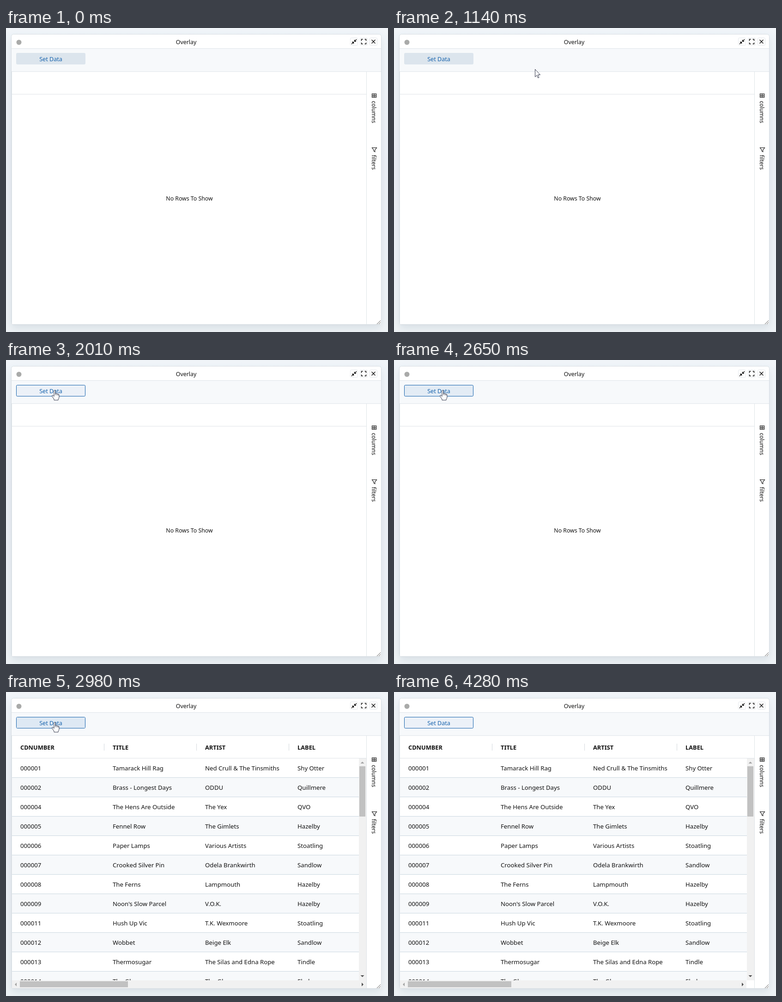
Recreate the animation shown at these times as an HTML page. Size 827 by 659 pixels, loop 4.76 s.

```html
<!DOCTYPE html>
<html lang="en">
<head>
<meta charset="utf-8">
<title>Overlay</title>
<style>
  html, body { margin: 0; width: 100%; height: 100%; overflow: hidden; background: #eff3f7; }
  svg { display: block; width: 827px; height: 659px; }
  text { font-family: "Noto Sans", "Open Sans", sans-serif; font-size: 13.2px; fill: #111; }
  .medium { font-weight: 500; }
  .head { font-weight: 700; font-size: 12.8px; }
  .side { font-size: 12.1px; }
  .line { fill: none; stroke: #111; stroke-width: 1.1; }
  .cursor { fill: #fff; stroke: #34384c; stroke-width: 1; stroke-linejoin: round; }
</style>
</head>
<body>
<svg viewBox="0 0 827 659">
  <defs>
    <linearGradient id="page" x2="0" y2="1">
      <stop stop-color="#f1f5f9"/>
      <stop offset=".45" stop-color="#eceff5"/>
      <stop offset="1" stop-color="#eff3f6"/>
    </linearGradient>
    <filter id="shadow" x="-10%" y="-10%" width="120%" height="120%">
      <feDropShadow dx="0" dy="8" stdDeviation="9" flood-color="#60748a" flood-opacity=".15"/>
    </filter>
    <clipPath id="buttonClip"><rect x="23" y="55" width="148" height="23" rx="1"/></clipPath>
    <clipPath id="rowClip"><rect x="13" y="144" width="751" height="481"/></clipPath>
  </defs>

  <rect width="827" height="659" fill="url(#page)"/>
  <rect x="11.5" y="13.5" width="801" height="630" rx="5" fill="#fff" stroke="#d6dde3" filter="url(#shadow)"/>

  <!-- title bar -->
  <circle cx="28" cy="31" r="5.5" fill="#a9aaa9"/>
  <text class="medium" x="390" y="35" text-anchor="middle" style="font-size:12.4px">Overlay</text>
  <g fill="#fff" stroke="#e4e8ec">
    <rect x="745.5" y="21.5" width="16" height="16" rx="2"/>
    <rect x="766.5" y="21.5" width="16" height="16" rx="2"/>
    <rect x="787.5" y="21.5" width="16" height="16" rx="2"/>
  </g>
  <path class="line" d="M754.5 25.5V29H758M754.5 29L759 24.5M749 30.5H752.5V34M752.5 30.5L748 35" style="stroke-width:1.4"/>
  <path class="line" d="M769.5 28V24.5H772.5M776.5 24.5H779.5V28M779.5 31.500V34.500H776.500M772.500 34.500H769.500V31.500" style="stroke-width:1.4"/>
  <path class="line" d="M791.500 25.500L799.500 33.500M799.500 25.500L791.500 33.500" style="stroke-width:1.4"/>

  <!-- toolbar -->
  <rect x="12" y="45" width="800" height="49" fill="#f7f9fb"/>
  <path d="M12 44.500H812M12 94.500H812" stroke="#dfe4e9"/>
  <rect id="button" x="22.500" y="54.500" width="149" height="24" rx="2"/>
  <circle id="ripple" cx="97" cy="67" clip-path="url(#buttonClip)"/>
  <text class="medium" x="97" y="72" text-anchor="middle" style="font-size:12.6px;fill:#1763ad">Set Data</text>

  <!-- grid body -->
  <path d="M12.500 95V642M13 143.500H780M13 642.500H811" stroke="#dfe4e8"/>
  <text id="empty" x="397" y="374" text-anchor="middle" style="font-size:12.3px">No Rows To Show</text>
  <g id="grid">
    <g id="rows" clip-path="url(#rowClip)"></g>
    <g id="heads"></g>
    <rect x="764" y="144" width="16" height="481" fill="#f1f1f1"/>
    <rect x="765" y="161" width="13" height="109" fill="#c1c1c1"/>
    <path d="M767.500 155H775.500L771.500 151Z" fill="#a3a3a3"/>
    <path d="M767.500 614H775.500L771.500 618Z" fill="#505050"/>
    <rect id="track" x="13" y="625" height="17" fill="#f1f1f1"/>
    <rect id="thumb" x="30" y="627" height="13" fill="#c1c1c1"/>
    <path d="M23 630V638L19 634Z" fill="#a3a3a3"/>
    <path id="rightArrow" d="M-2 -4V4L2 0Z" fill="#505050"/>
  </g>

  <!-- side bar -->
  <path d="M780.500 95V642" stroke="#dfe4e8"/>
  <path class="line" d="M792.500 142.500H801.500V150.500H792.500ZM792.500 145.500H801.500M792.500 148H801.500M797 143V150"/>
  <path class="line" d="M792.500 259.500H802.500L798.700 264.500V268.500L796 266.500V264.500Z"/>
  <text class="side" transform="translate(792 158) rotate(90)">columns</text>
  <text class="side" transform="translate(792 275) rotate(90)">filters</text>
  <path d="M803 642L811 634M807 642L811 638" stroke="#555"/>

  <g id="cursor" class="cursor">
    <path data-kind="arrow" d="M.5 .5V17L4.200 13.500L6.700 19.200L9 18.200L6.500 12.500H11.500Z"/>
    <path data-kind="move" d="M0 -10.500L4 -6.500H1.500V-1.500H6.500V-4L10.500 0L6.500 4V1.500H1.500V6.500H4L0 10.500L-4 6.500H-1.500V1.500H-6.500V4L-10.500 0L-6.500 -4V-1.500H-1.500V-6.500H-4Z"/>
    <g data-kind="hand">
      <path d="M-2 1Q-2 -.5 -.500 -.500Q1 -.500 1 1V6.500Q3.500 5 4.200 7.500Q6.500 6.500 7 8.500Q9 8 9 10.500V14Q9 17 7 19V21H-2V19L-6.200 12.500Q-6.800 10.500 -5 10.500Q-3.500 10.800 -2 13Z"/>
      <path d="M1 6V10M4.200 7.500V10.500M7 8.500V11" fill="none"/>
    </g>
  </g>
</svg>

<script>
const LOOP = 4760, HOVER = 1930, PRESS = 2650, RELEASE = 2820, FILLED = 2980;
const NS = "http://www.w3.org/2000/svg";
const $ = id => document.getElementById(id);

function set(node, attrs) {
  for (const key in attrs) node.setAttribute(key, attrs[key]);
}
function add(parent, tag, attrs, text) {
  const node = document.createElementNS(NS, tag);
  set(node, attrs);
  if (text) node.textContent = text;
  parent.appendChild(node);
}
const show = (node, on) => node.setAttribute("visibility", on ? "visible" : "hidden");

const records = [
  ["000001", "Tamarack Hill Rag", "Ned Crull & The Tinsmiths", "Shy Otter"],
  ["000002", "Brass - Longest Days", "ODDU", "Quillmere"],
  ["000004", "The Hens Are Outside", "The Yex", "QVO"],
  ["000005", "Fennel Row", "The Gimlets", "Hazelby"],
  ["000006", "Paper Lamps", "Various Artists", "Stoatling"],
  ["000007", "Crooked Silver Pin", "Odela Brankwirth", "Sandlow"],
  ["000008", "The Ferns", "Lampmouth", "Hazelby"],
  ["000009", "Noon's Slow Parcel", "V.O.K.", "Hazelby"],
  ["000011", "Hush Up Vic", "T.K. Wexmoore", "Stoatling"],
  ["000012", "Wobbet", "Beige Elk", "Sandlow"],
  ["000013", "Thermosugar", "The Silas and Edna Rope", "Tindle"],
  ["000014", "The Glens", "The Glens", "Elmbury"]
];

function buildGrid() {
  records.forEach((cells, row) => {
    const y = 144 + row * 42;
    add($("rows"), "rect", { x: 13, y, width: 751, height: 42, fill: row % 2 ? "#f7f9fb" : "#fff" });
    add($("rows"), "path", { d: `M13 ${y + 41.5}H764`, stroke: "#cbd8e1" });
    cells.forEach((cell, col) => add($("rows"), "text", { x: 31 + col * 200, y: y + 26 }, cell));
  });
  ["CDNUMBER", "TITLE", "ARTIST", "LABEL"].forEach((name, col) => {
    add($("heads"), "text", { class: "head", x: 31 + col * 200, y: 125 }, name);
    if (col) add($("heads"), "path", { d: `M${12.5 + col * 200} 112V127`, stroke: "#d5dade" });
  });
}

// Pointer strokes: each advances in even steps along a quadratic curve.
const strokes = [
  { at: 430, gap: 78.3, first: 0, steps: 6, path: [[554, 385], [407, 331], [314, 133]] },
  { at: 970, gap: 81.6, first: 1, steps: 7, path: [[314, 133], [303, 78], [293, 38]] },
  { at: 1610, gap: 80, first: 1, steps: 6, path: [[293, 38], [188, 44], [106, 66]] }
];

function pointerAt(t) {
  const stroke = strokes.filter(s => t >= s.at).pop();
  if (!stroke || t >= 4190) return null;
  const step = stroke.first + Math.floor((t - stroke.at) / stroke.gap);
  const u = Math.min(1, step / stroke.steps), v = 1 - u;
  const [a, b, c] = stroke.path;
  return [0, 1].map(i => Math.round(v * v * a[i] + 2 * v * u * b[i] + u * u * c[i]));
}

function kindAt(x, y) {
  if (y < 45) return "move";
  return x < 172 && y > 54 && y < 79 ? "hand" : "arrow";
}

function drawPointer(t) {
  const point = pointerAt(t);
  const kind = point && kindAt(...point);
  for (const shape of $("cursor").children) show(shape, shape.dataset.kind === kind);
  if (point) set($("cursor"), { transform: `translate(${point})` });
}

function drawButton(t) {
  const hover = t >= HOVER, pressed = t >= PRESS && t < 3130;
  set($("button"), {
    fill: pressed ? "#e3ecf5" : hover ? "#ecf1f8" : "#dce5ed",
    stroke: hover ? "#1763ad" : "#dce5ed"
  });
  const step = Math.floor((t - RELEASE) / 80);
  const rippling = step >= 0 && t < 3130;
  show($("ripple"), rippling);
  if (rippling) {
    set($("ripple"), { r: 24 + step * 36, fill: ["#c0d6ec", "#c9dbed", "#dee9f4", "#e6eef6"][Math.min(step, 3)] });
  }
}

function drawGrid(t) {
  const filled = t >= FILLED, settled = t >= 3060;
  show($("grid"), filled);
  show($("empty"), !filled);
  set($("track"), { width: settled ? 750 : 767 });
  set($("thumb"), { width: settled ? 224 : 234 });
  set($("rightArrow"), { transform: `translate(${settled ? 755 : 772} 634)` });
}

function draw(t) {
  drawButton(t);
  drawGrid(t);
  drawPointer(t);
}

buildGrid();
const start = performance.now();
function tick() {
  draw((performance.now() - start) % LOOP);
  requestAnimationFrame(tick);
}
tick();
</script>
</body>
</html>
```
